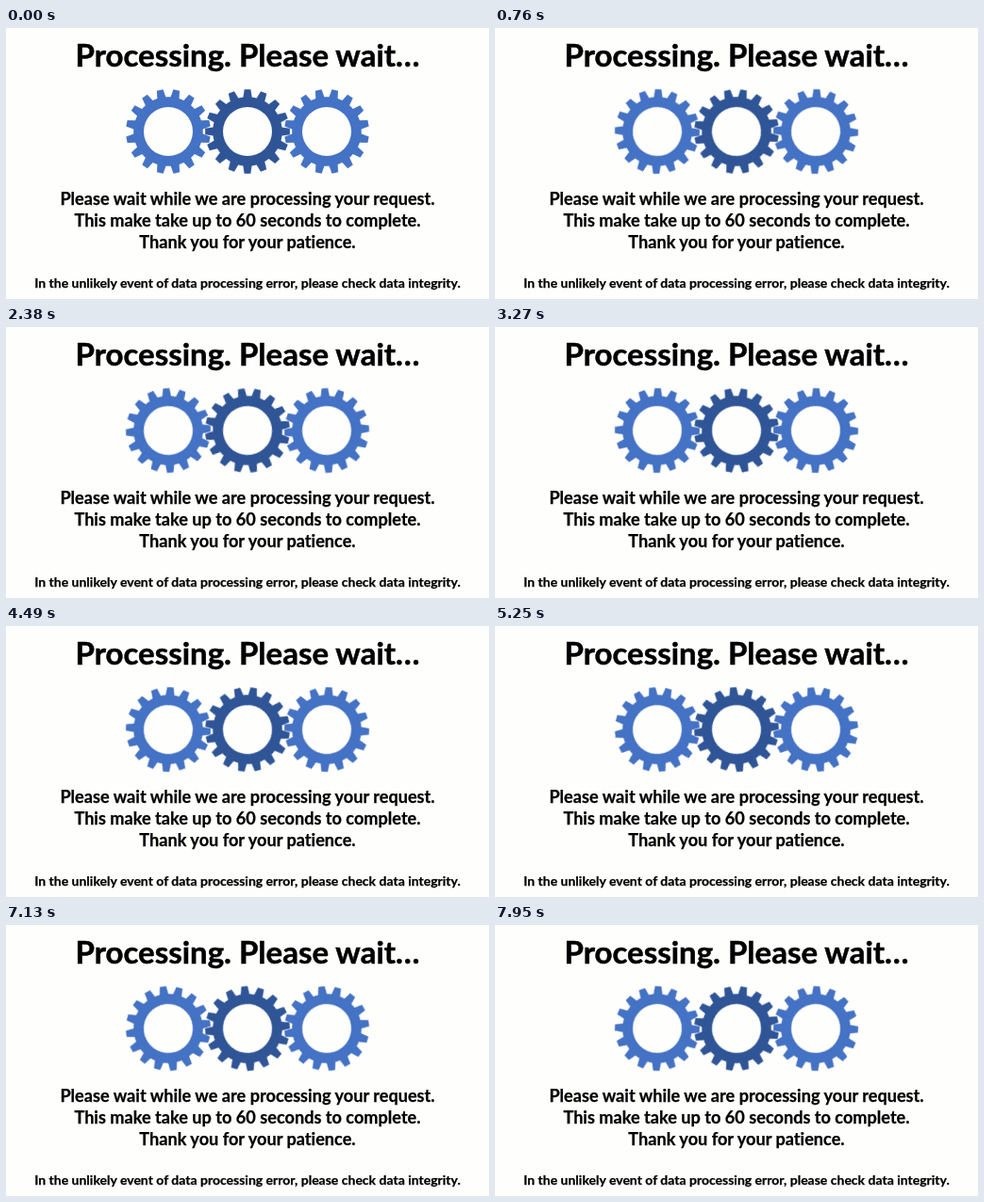
Write an HTML page that moves like this. It is 512 by 288 pixels and loops after 7.99 s.

```html
<!DOCTYPE html>
<html lang="en">
<head>
<meta charset="utf-8">
<title>Processing</title>
<style>
  html, body { margin: 0; width: 100%; height: 100%; overflow: hidden; background: #fefefd; }
  svg { display: block; width: 100%; height: 100%; }
  text {
    font-family: Lato, Carlito, sans-serif; font-weight: 700; font-variant-ligatures: none;
    text-anchor: middle; fill: #000; stroke: #000; stroke-width: 0.25px;
  }
  .title { font-size: 33px; stroke-width: 0.5px; }
  .body { font-size: 18.15px; }
  .note { font-size: 14px; }
  .gear { animation: spin 7990ms linear infinite; fill: #2f5597; }
  .outer { animation-name: spin-back; fill: #4472c4; }
  /* 72 degrees per second */
  @keyframes spin { to { transform: rotate(575.28deg); } }
  @keyframes spin-back { to { transform: rotate(-575.28deg); } }
</style>
</head>
<body>
<svg viewBox="0 0 512 288">
  <text class="title" x="256" y="41">Processing. Please wait…</text>
  <g transform="translate(172 110)"><path class="gear outer" data-turn="0.5"/></g>
  <g transform="translate(340 110)"><path class="gear outer" data-turn="0.5"/></g>
  <g transform="translate(256 110)"><path class="gear" data-turn="0"/></g>
  <g class="body">
    <text x="256" y="188">Please wait while we are processing your request.</text>
    <text x="256" y="211">This make take up to 60 seconds to complete.</text>
    <text x="256" y="234">Thank you for your patience.</text>
  </g>
  <text class="note" x="256" y="276">In the unlikely event of data processing error, please check data integrity.</text>
</svg>
<script>
  const TEETH = 16, TIP = 45, ROOT = 36.8, HOLE = 26;
  const pitch = 2 * Math.PI / TEETH;

  const polar = (radius, angle) =>
    `${(radius * Math.cos(angle)).toFixed(2)} ${(radius * Math.sin(angle)).toFixed(2)}`;

  // turn: start offset as a share of one tooth pitch
  function gearPath(turn) {
    let d = '';
    for (let i = 0; i < TEETH; i++) {
      const mid = (i + turn) * pitch;
      const base = pitch * 0.32, tip = pitch * 0.19;
      d += `${i ? `A${ROOT} ${ROOT} 0 0 1 ` : 'M'}${polar(ROOT, mid - base)}`
        + `L${polar(TIP, mid - tip)}L${polar(TIP, mid + tip)}L${polar(ROOT, mid + base)}`;
    }
    return `${d}ZM${HOLE} 0A${HOLE} ${HOLE} 0 1 0 ${-HOLE} 0A${HOLE} ${HOLE} 0 1 0 ${HOLE} 0Z`;
  }

  for (const gear of document.querySelectorAll('.gear')) {
    gear.setAttribute('d', gearPath(+gear.dataset.turn));
    gear.setAttribute('fill-rule', 'evenodd');
  }
</script>
</body>
</html>
```
